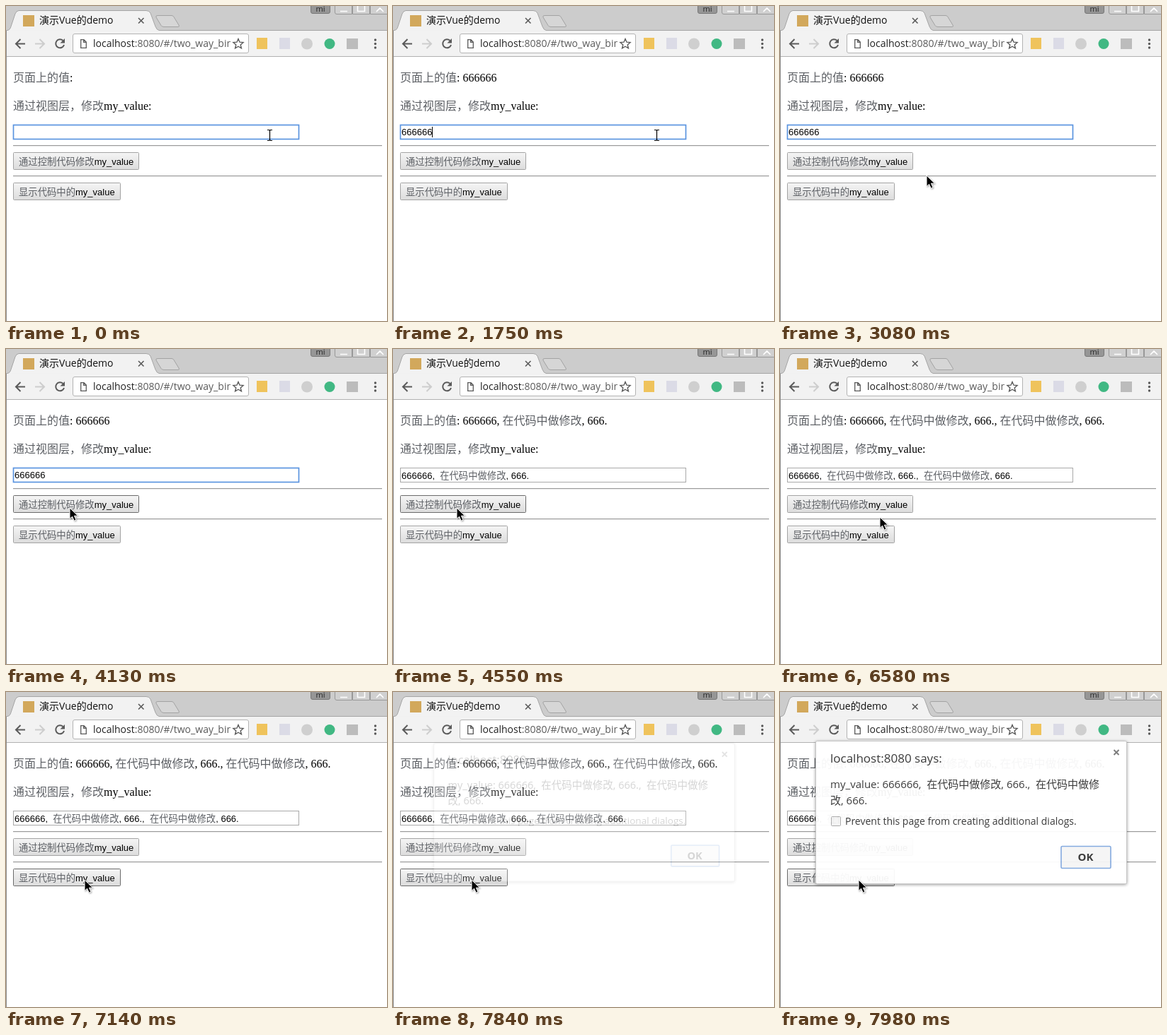
An HTML page that plays this animation: 538x446 px, repeating every 8 s.

```html
<!DOCTYPE html>
<html lang="zh-CN">
<head>
<meta charset="utf-8">
<title>演示Vue的demo</title>
<style>
  html, body { margin: 0; width: 100%; height: 100%; overflow: hidden; background: #fff; }
  svg { display: block; width: 538px; height: 446px; }
  text { white-space: pre; font-family: "Open Sans", "Noto Sans", "Noto Sans CJK SC", "Noto Sans CJK", sans-serif; }
  .page { font: 16px "Liberation Serif", "Noto Sans CJK SC", "Noto Sans CJK", serif; }
  .ctl { font: 13px "Liberation Sans", "Noto Sans CJK SC", "Noto Sans CJK", sans-serif; }
  .page .c, .ctl .c { font-family: "Noto Sans CJK SC", "Noto Sans CJK", sans-serif; font-weight: 300; fill: #5c5f64; }
  .ctl .c { font-size: 13.333px; }
  .btn rect { fill: url(#face); stroke: #a3a3a3; }
  .btn.hover rect { stroke: #6b6b6b; }
  .btn.down rect { fill: url(#sunk); }
  #field { fill: #fff; stroke: #a9a9a9; }
  #field.focus { stroke: #5b94e0; stroke-width: 1.7; }
  #dialog { transform-origin: 270px 170.5px; }
  #dialog text { fill: #333; }
  .box { filter: drop-shadow(0 1px 2px rgba(0, 0, 0, .4)); }
  .line { fill: none; stroke: #5a5a5a; stroke-width: 2; }
</style>
</head>
<body>
<svg viewBox="0 0 538 446">
  <defs>
    <linearGradient id="face" x2="0" y2="1"><stop stop-color="#f5f5f5"/><stop offset="1" stop-color="#dcdcdc"/></linearGradient>
    <linearGradient id="sunk" x2="0" y2="1"><stop stop-color="#d4d4d4"/><stop offset="1" stop-color="#e6e6e6"/></linearGradient>
    <clipPath id="urlClip"><path d="M120 42H317V66H120Z"/></clipPath>
  </defs>

  <!-- window frame and tab -->
  <rect width="538" height="36" fill="#cccccc"/>
  <rect y="34" width="538" height="37" fill="#f2f2f2"/>
  <path d="M0 34.5H2C5 34 6 32 7 29L13 11Q14.5 7 18 6.500H198Q202 6.500 204 10L211 29Q213 34 216 34.500H538" fill="#f2f2f2" stroke="#a5a5a5"/>
  <path d="M214 13.500H234Q236 13.500 237 15.500L244 27Q245.500 29.500 243 29.500H223Q220 29.500 219 27.500L212 16Q211 13.500 214 13.500Z" fill="#d6d6d6" stroke="#a3a3a3"/>
  <rect x="24" y="13" width="16" height="16" fill="#d2a85c"/>
  <text x="47" y="25" font-size="14" fill="#111">演示Vue的demo</text>
  <path class="line" d="M187 17L194.500 24.500M194.500 17L187 24.500" style="stroke-width:1.6"/>
  <g fill="#d0d0d0" stroke="#989898">
    <path d="M430.500 -2H457.500V8Q457.500 10.500 455 10.500H433Q430.500 10.500 430.500 8Z" fill="#969696" stroke="#777"/>
    <path d="M464.500 -2H488.500V11.500H467Q464.500 11.500 464.500 9ZM489.500 -2H513.500V11.500H489.500ZM514.500 -2H540V11.500H514.500Z"/>
    <path d="M472 7.500H482M496.500 0V7.500H506.500V0M523 8L528 3L533 8" fill="none" stroke="#fff" stroke-width="1.6"/>
  </g>
  <text x="444" y="8" font-size="11" text-anchor="middle" fill="#222">mi</text>

  <!-- toolbar -->
  <path class="line" d="M27 53.500H14.500M20.500 47L14 53.500L20.500 60"/>
  <path class="line" d="M41 53.500H53.500M47.500 47L54 53.500L47.500 60" style="stroke:#cdcdcd"/>
  <path class="line" d="M80.500 49A6 6 0 1 0 82 55"/>
  <path d="M83 46V52.500H76.500Z" fill="#5a5a5a"/>
  <rect x="94.500" y="39.500" width="248" height="27" rx="2.500" fill="#fff" stroke="#b3b3b3"/>
  <path class="line" d="M105.700 47.700H110L113.300 51V59.300H105.700ZM109.700 48V51.300H113" style="stroke-width:1.3"/>
  <text x="123" y="58" font-size="14" fill="#5a5a5a" clip-path="url(#urlClip)"><tspan fill="#222">localhost</tspan>:8080/#/two_way_bin</text>
  <path class="line" d="M328 46.500L330 51.200L335 51.600L331.200 54.900L332.400 59.800L328 57.200L323.600 59.800L324.800 54.900L321 51.600L326 51.200Z" style="stroke-width:1.4"/>
  <rect x="354" y="45" width="15" height="16" fill="#efc35c"/>
  <rect x="386" y="45" width="15" height="16" fill="#dbdbe6"/>
  <circle cx="425" cy="53.500" r="8" fill="#cfcfcf"/>
  <circle cx="457" cy="53.500" r="7.500" fill="#41b883"/>
  <rect x="481" y="46" width="16" height="15" fill="#bcbcbc"/>
  <g fill="#5a5a5a"><circle cx="521.500" cy="48" r="1.700"/><circle cx="521.500" cy="53.500" r="1.700"/><circle cx="521.500" cy="59" r="1.700"/></g>
  <rect y="71" width="538" height="1" fill="#b2b2b2"/>

  <!-- page -->
  <rect y="72" width="538" height="374" fill="#fff"/>
  <rect y="35" width="1" height="411" fill="#8c8c8c"/>
  <text id="shown" class="page" x="10" y="107"></text>
  <text class="page" x="10" y="147">通过视图层，修改my_value:</text>
  <rect id="field" x="10.500" y="168.500" width="403" height="20"/>
  <text id="typed" class="ctl" x="12" y="183"></text>
  <rect id="caret" y="171" width="1" height="15"/>
  <path d="M10 197.500H531M10 240.500H531" stroke="#9a9a9a"/>
  <path d="M10 198.500H531M10 241.500H531" stroke="#e9e9e9"/>
  <g id="edit" class="btn">
    <rect x="10.500" y="207.500" width="177" height="24" rx="1"/>
    <text class="ctl" x="18" y="225">通过控制代码修改my_value</text>
  </g>
  <g id="show" class="btn">
    <rect x="10.500" y="250.500" width="151" height="24" rx="1"/>
    <text class="ctl" x="18" y="268">显示代码中的my_value</text>
  </g>

  <g id="dialog">
    <rect class="box" x="50.500" y="69.500" width="439" height="202" rx="2" fill="#fff" stroke="#c4c4c4"/>
    <text x="71" y="100" font-size="17">localhost:8080 says:</text>
    <path d="M471.500 82L478.500 89M478.500 82L471.500 89" stroke="#777" stroke-width="2"/>
    <text x="71" y="136" font-size="15">my_value: 666666,  在代码中做修改, 666.,  在代码中做修</text>
    <text x="71" y="159" font-size="15">改, 666.</text>
    <rect x="72.500" y="176.500" width="13" height="13" rx="1" fill="#f4f4f4" stroke="#a8a8a8"/>
    <text x="92" y="188" font-size="14">Prevent this page from creating additional dialogs.</text>
    <rect x="397" y="218.500" width="70" height="31" rx="1.500" fill="#f5f5f5" stroke="#7ea6de" stroke-width="1.6"/>
    <text x="431.500" y="239" font-size="15" font-weight="700" text-anchor="middle">OK</text>
  </g>

  <path id="beam" d="M369 175.500H371.500L372.500 176.500L373.500 175.500H376M372.500 176V190M369 190.500H371.500L372.500 189.500L373.500 190.500H376" fill="none" stroke="#000" stroke-width="1.2"/>
  <path id="arrow" d="M0 0V15.500L3.600 12.200L6.200 18.200L9 17L6.400 11.200H11.500Z" stroke="#fff" stroke-width="1" style="filter:drop-shadow(1px 1px 1px rgba(0,0,0,.35))"/>
</svg>
<script>
const LOOP = 8000, TICK = 70;
const $ = id => document.getElementById(id);
const keyTimes = [840, 980, 1190, 1330, 1540, 1750];
const editTimes = [4550, 6020];
const added = ",  在代码中做修改, 666.";
// time, x, y of the pointer tip
const path = [
  [2590, 372, 183], [2660, 369, 184], [2730, 352, 188], [2800, 325, 197],
  [3010, 232, 232], [3080, 207, 240], [3220, 170, 256], [3290, 155, 259],
  [3430, 140, 257], [3500, 129, 249], [3640, 107, 228], [3710, 107, 228],
  [3920, 90, 225], [5250, 90, 225], [5670, 107, 222], [6370, 107, 222],
  [6580, 141, 238], [6720, 146, 248], [6860, 136, 257], [7140, 111, 266]
];

const within = (t, a, b) => t >= a && t < b;
const passed = (list, t) => list.filter(x => t >= x).length;
const display = (el, on) => { el.style.display = on ? "" : "none"; };

function setText(el, s) {
  if (el.value === s) return;
  el.value = s;
  el.innerHTML = s.replace(/[\u3000-\u9fff\uff00-\uffef]+/g, '<tspan class="c">$&</tspan>');
}

function pointerAt(t) {
  const i = path.findIndex(p => p[0] > t);
  if (i === 0) return path[0].slice(1);
  if (i < 0) return path[path.length - 1].slice(1);
  const [a, b] = [path[i - 1], path[i]];
  const k = (t - a[0]) / (b[0] - a[0]);
  return [1, 2].map(n => Math.round(a[n] + (b[n] - a[n]) * k));
}

function drawButton(el, hover, down) {
  el.classList.toggle("hover", hover);
  el.classList.toggle("down", down);
}

function draw(time) {
  const t = Math.floor(time / TICK + 1e-6) * TICK;
  const keys = passed(keyTimes, t), edits = passed(editTimes, t);
  const value = "6".repeat(keys) + added.repeat(edits);
  setText($("shown"), "页面上的值: " + value.replace(/ +/g, " "));
  setText($("typed"), value);
  $("typed").setAttribute("y", edits ? 184 : 183);
  $("field").classList.toggle("focus", t < 4410);
  $("caret").setAttribute("x", Math.floor(12 + 7.23 * keys));
  display($("caret"), within(t, 700, 2520) || within(t, 3150, 4130));

  const [x, y] = pointerAt(t);
  const overField = y < 190;
  display($("beam"), overField);
  display($("arrow"), !overField);
  $("beam").setAttribute("transform", `translate(${x - 372} ${y - 183})`);
  $("arrow").setAttribute("transform", `translate(${x} ${y})`);
  drawButton($("edit"), within(x, 10, 188) && within(y, 207, 232), within(t, 4410, 4550) || within(t, 5950, 6020));
  drawButton($("show"), within(x, 10, 162) && within(y, 250, 275), within(t, 7700, 7840));

  const k = Math.min(1, Math.max(0, (t - 7840) / 140));
  display($("dialog"), t >= 7840);
  $("dialog").style.opacity = 0.2 + 0.75 * k * (1.6 - 0.6 * k);
  $("dialog").style.transform = `scale(${0.967 + 0.033 * k * (1.6 - 0.6 * k)})`;
}

document.querySelectorAll("text.page, text.ctl").forEach(el => setText(el, el.textContent));
const start = performance.now();
function frame() {
  draw((performance.now() - start) % LOOP);
  requestAnimationFrame(frame);
}
frame();
</script>
</body>
</html>
```
